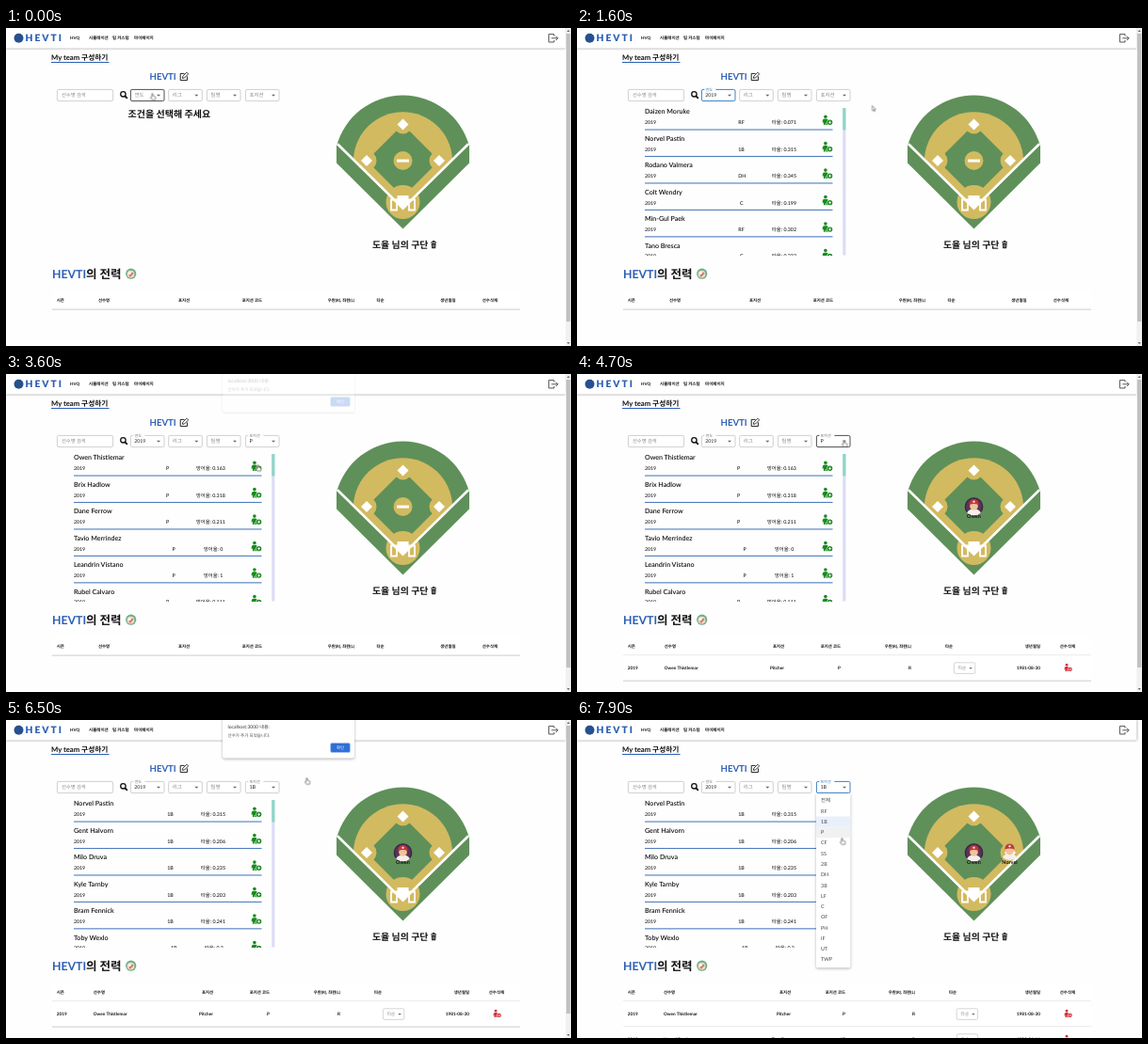
An HTML page that plays this animation: 600x338 px, repeating every 8000 ms.

```html
<!DOCTYPE html>
<html lang="ko">
<head>
<meta charset="utf-8">
<title>My team</title>
<style>
html, body { margin: 0; width: 100%; height: 100%; overflow: hidden; background: #fff; }
svg { display: block; width: 600px; height: 338px; }
text { font-family: Lato, "Noto Sans CJK KR", "Noto Sans KR", "Noto Sans CJK", sans-serif; white-space: pre; text-rendering: geometricPrecision; }
.card { filter: drop-shadow(0 1px .6px rgba(0,0,0,.2)); }
.paper { filter: drop-shadow(0 1.2px 1.6px rgba(0,0,0,.3)); }
</style>
</head>
<body>
<svg id="stage" viewBox="0 0 600 338" xmlns="http://www.w3.org/2000/svg"></svg>
<script>
const LOOP = 8000, BLUE = '#2c5fb5', FOCUS = '#3a80c8', BRAND = 'HEVTI';
let css = '', count = 0;

// Frames are [ms, declarations, glide]; without glide a value holds until the next one.
function track(sel, frames) {
  const name = 'k' + count++;
  const body = frames.map(([t, decl, glide], i) => {
    const next = i + 1 < frames.length ? frames[i + 1][0] : LOOP;
    const ease = glide ? `steps(${Math.max(1, Math.round((next - t) / 100))})` : 'step-end';
    return `${t / LOOP * 100}%{${decl};animation-timing-function:${ease}}`;
  });
  body.push(`100%{${frames[frames.length - 1][1]}}`);
  css += `@keyframes ${name}{${body.join('')}}${sel}{animation:${name} ${LOOP}ms infinite}`;
}

// Spans are [from, to, fadeIn, fadeOut].
function show(sel, ...spans) {
  const off = 'opacity:0', on = 'opacity:1';
  const frames = spans[0][0] > 0 ? [[0, off]] : [];
  for (const [from, to, fadeIn = 0, fadeOut = 0] of spans) {
    if (fadeIn) frames.push([from, off, true]);
    frames.push([from + fadeIn, on]);
    if (fadeOut) frames.push([to - fadeOut, on, true]);
    if (to < LOOP) frames.push([to, off]);
  }
  track(sel, frames);
}

const text = (x, y, size, str, { fill = '#111', weight = 400, anchor = 'start', more = '' } = {}) =>
  `<text x="${x}" y="${y}" font-size="${size}" fill="${fill}" font-weight="${weight}" text-anchor="${anchor}" ${more}>${str}</text>`;
const rect = (x, y, w, h, fill, more = '') =>
  `<rect x="${x}" y="${y}" width="${w}" height="${h}" fill="${fill}" ${more}/>`;
const circle = (x, y, r, fill, more = '') => `<circle cx="${x}" cy="${y}" r="${r}" fill="${fill}" ${more}/>`;
const path = (d, fill, more = '') => `<path d="${d}" fill="${fill}" ${more}/>`;
const line = (d, stroke, w, more = '') => path(d, 'none', `stroke="${stroke}" stroke-width="${w}" ${more}`);
const group = (id, body, more = '') => `<g id="${id}" ${more}>${body}</g>`;
const at = (x, y, body, scale = 1) => `<g transform="translate(${x} ${y}) scale(${scale})">${body}</g>`;

function header() {
  const nav = [[68, 'HVQ'], [88, '시뮬레이션'], [113, '팀 커스텀'], [136, '마이페이지']];
  return rect(0, 0, 594.4, 21.6, '#fff', 'style="filter:drop-shadow(0 .8px .9px rgba(0,0,0,.5))"')
    + circle(13.5, 10.8, 5, '#27508f')
    + text(20.5, 14.2, 10.2, BRAND, { fill: BLUE, weight: 900, more: 'letter-spacing="2"' })
    + nav.map(([x, s]) => text(x, 12.3, 4.5, s, { weight: 700 })).join('')
    + line('M582 8.6V6.6H576.4V15H582V13M579.3 10.8H586M583.8 8.5L586.1 10.8L583.8 13.1', '#555', 1);
}

function titles() {
  return text(48, 33.6, 7.7, 'My team 구성하기', { weight: 700 })
    + rect(48, 36, 61.5, 1, BLUE)
    + text(152.5, 55.4, 9.6, BRAND, { fill: BLUE, weight: 700 })
    + line('M189.5 48.4H185.2V55.6H192.4V51.4', '#222', 1)
    + path('M187.4 53.4L187.8 51.3L191.9 47.2L193.6 48.9L189.5 53Z', '#fff', 'stroke="#222" stroke-width=".9"')
    + text(389, 233.5, 9.9, '도율 님의 구단', { weight: 700 })
    + path('M451.3 227.2H457V228.4H451.3ZM452.8 226H455.5V227H452.8ZM451.7 229H456.6L456.2 234.2H452.1Z', '#222')
    + line('M453.3 230V233.2M455 230V233.2', '#fff', .5)
    + text(49, 265.8, 12.3, BRAND, { fill: BLUE, weight: 700 })
    + text(85, 265.8, 12.5, '의 전력', { weight: 700 })
    + circle(132.7, 261.2, 5.6, '#6fb088')
    + circle(132.5, 261.6, 3.9, '#f1ddcb')
    + path('M130.2 263.4L134 259.4L135.6 260.8L132 264.8Z', '#cf7a68')
    + circle(131.4, 260.6, 1.2, '#fff');
}

function select(id, x, label, filled) {
  const arrow = `${x + 28} 70.7h4l-2 2.1z`;
  return rect(x + .4, 65.4, 35.6, 12.2, '#fff', `id="${id}-box" rx="1.5" stroke="#c4c4c4" stroke-width=".8"`)
    + text(x + 4.5, 73.4, 5.5, label, { fill: '#888', more: `id="${id}-hint"` })
    + path('M' + arrow, '#666')
    + (filled ? group(id + '-value',
      rect(x + 3.4, 64.4, 4 + label.length * 4, 2, '#fff')
      + text(x + 4.4, 66.6, 4.1, label, { fill: '#777', more: `id="${id}-label"` })) : '');
}

function filters() {
  return rect(54.4, 65.4, 59.2, 12.2, '#fff', 'rx="1.5" stroke="#c4c4c4" stroke-width=".8"')
    + text(59, 73.4, 5.3, '선수명 검색', { fill: '#888' })
    + circle(124.4, 70.3, 2.7, 'none', 'stroke="#111" stroke-width="1.3"')
    + line('M126.4 72.3L128.8 74.8', '#111', 1.8)
    + select('year', 132, '연도', true)
    + group('y2019', text(136.2, 73.4, 5.2, '2019', { fill: '#222' }))
    + select('league', 172.3, '리그')
    + select('team', 213, '팀명')
    + select('pos', 254, '포지션', true)
    + group('posP', text(258.4, 73.4, 5.4, 'P', { fill: '#222' }))
    + group('pos1B', text(258.4, 73.4, 5.4, '1B', { fill: '#222' }));
}

function field() {
  const green = '#5f9059', tan = '#d2ba60';
  const base = (x, y) => path(`M${x} ${y - 6}l6 6l-6 6l-6 -6z`, '#fff');
  return path('M351 125.6A73 73 0 0 1 492 125.6V143.4L421.5 213.4L351 143.4Z', green)
    + path('M369 138.6A52.6 52.6 0 0 1 474 138.6L421.5 191Z', tan)
    + path('M421.5 102.5L460 141L421.5 179.5L383 141Z', green)
    + circle(421.5, 102.5, 10, tan) + circle(383, 141, 10.5, tan) + circle(460, 141, 10.5, tan)
    + circle(421.5, 141, 10, tan) + circle(421.5, 185, 18, tan)
    + line('M352 123.2L421.5 191.6L491 123.2', '#fff', 2.6)
    + base(421.5, 102.5) + base(383, 141) + base(460, 141)
    + rect(415, 139.6, 13, 3, '#fff')
    + path('M415.5 178H427.5V185L421.5 191L415.5 185Z', '#fff')
    + line('M409 182.5H415V193.5H409ZM428 182.5H434V193.5H428Z', '#fff', 1.8);
}

function token(x, y, name, back) {
  return at(x, y, (back ? circle(0, 0, 10, '#33284a') + circle(0, 0, 8.4, '#5a3553') : '')
    + path('M-7.4 6.4Q-5.4 2.4 0 2.4Q5.4 2.4 7.4 6.4Q4 9.6 0 9.6Q-4 9.6 -7.4 6.4Z', '#f4efec')
    + circle(0, -.6, 4.3, '#efc49d')
    + path('M-5.2 -2Q-4.8 -8 0 -8Q4.8 -8 5.2 -2Q0 -4 -5.2 -2Z', '#c3383b')
    + rect(-1, -6.2, 2, 1.8, '#fff'))
    + text(x, 152.8, 5.5, name, { weight: 700, anchor: 'middle' });
}

const person = (x, y, color, mark, scale) => at(x, y,
  circle(3.9, 1.9, 1.8, color)
  + path('M.6 8.2Q.6 4.4 2.6 4.2H5.2Q6.6 4.4 7 6V10.7H4.4V8.6H3.7V10.7H1.9V6.8L1.5 8.4Z', color)
  + circle(8.6, 8, 3.2, '#fff') + circle(8.6, 8, 2.7, color)
  + line(mark, '#fff', .8), scale);
const PLUS = 'M7 8H10.2M8.6 6.4V9.6', CROSS = 'M7.5 6.9L9.7 9.1M9.7 6.9L7.5 9.1';

// Rows are [name, position, stat].
function list(id, stat, rows) {
  const sub = { weight: 500 };
  const items = rows.map(([name, pos, value], i) => {
    const y = 80 + i * 28.45, short = value.length < 4;
    const statX = stat === '타율' ? (short ? 211 : 207) : (short ? 210 : 202);
    const posX = stat === '타율' ? (short ? 175 : pos === 'C' ? 173 : 171.3) : (short ? 176.5 : 170);
    return text(72, y + 11.4, 7.1, name, { weight: 600 })
      + text(72, y + 22.2, 5.2, '2019', sub)
      + text(posX, y + 22.2, 5.3, pos, sub)
      + text(statX, y + 22.2, 5.3, `${stat}: ${value}`, sub)
      + person(260, y + 12.3, '#178a1c', PLUS)
      + rect(72, y + 27.5, 199.5, 1.1, '#4f7cbd');
  });
  return group(id, items.join('') + rect(282.2, 85, 3.2, 156.5, '#dcdcf8') + rect(282.2, 85, 3.2, 23.5, '#8fd6c6'),
    'clip-path="url(#listClip)"');
}

// ends: right edges of position, code, hand, order, birth and delete columns.
function table(id, nameX, ends, selX, rows) {
  const heads = ['포지션', '포지션 코드', '우완(R), 좌완(L)', '타순', '생년월일', '선수삭제'];
  const bold = { weight: 700 }, end = { weight: 700, anchor: 'end' };
  const top = text(53.8, 291.2, 4.4, '시즌', bold) + text(nameX, 291.2, 4.4, '선수명', bold)
    + heads.map((h, i) => text(ends[i], 291.2, 4.4, h, end)).join('');
  const body = rows.map(([name, pos, code, birth], i) => {
    const y = 299 + i * 27;
    return rect(49, y - .6, 497, .7, '#e2e2e2')
      + text(53.8, y + 14.7, 4.7, '2019', bold) + text(nameX, y + 14.7, 4.7, name, bold)
      + [[0, pos], [1, code], [2, 'R'], [4, birth]].map(([c, s]) => text(ends[c], y + 14.7, 4.7, s, end)).join('')
      + rect(selX, y + 7.8, 22.4, 11.6, '#fff', 'rx="1.4" stroke="#c4c4c4" stroke-width=".7"')
      + text(selX + 4.4, y + 15.4, 4.7, '타순', { fill: '#888' })
      + path(`M${selX + 16} ${y + 13}h3.4l-1.7 1.8z`, '#666')
      + person(517, y + 8.7, '#d3323b', CROSS, .78);
  });
  const h = 18.6 + rows.length * 27;
  return group(id, rect(49, 280, 497, h, '#fff', 'class="card"') + top + body.join(''));
}

const PITCH = 11.27;
function menu(id, x, items, inner = '') {
  return group(id, rect(x, 78, 36.4, items.length * PITCH + 5, '#fff', 'rx="1.5" class="paper"') + inner
    + items.map((s, i) => text(x + 5, 87.4 + i * PITCH, 5.4, s, { fill: '#444' })).join(''));
}

function dialog() {
  return group('dialog', rect(230, -4, 140, 44.6, '#fff', 'rx="2.5" class="paper"')
    + text(235.5, 9.4, 5, 'localhost:3000 내용:', { fill: '#333' })
    + text(235.5, 18, 4.5, '선수가 추가 되었습니다.', { fill: '#444' })
    + rect(344.6, 24.4, 20.8, 10.2, '#2f6fd6', 'rx="1.6" stroke="#a9c5f2" stroke-width=".8"')
    + text(355, 31.2, 4.4, '확인', { fill: '#fff', anchor: 'middle' }));
}

const pageBar = group('pageBar', rect(594.3, 0, 5.7, 338, '#f1f1f1') + rect(595, 6, 4.3, 306, '#c1c1c1')
  + path('M595.6 4L597.2 2L598.8 4ZM595.6 334L597.2 336L598.8 334Z', '#666'));

const cursor = group('cursor',
  group('arrow', path('M0 0V5.4L1.3 4.3L2.2 6.3L3 5.9L2.2 4H3.8Z', '#fff', 'stroke="#333" stroke-width=".5"'))
  + group('hand', path('M-.7 .5Q0 -.4 .7 .5V2.8L3 3.3Q3.6 3.6 3.5 4.4L3 6.8H-.4L-2.1 4.4Q-2 3.6 -.7 4.2Z',
    '#fff', 'stroke="#333" stroke-width=".55"')));

const posItems = '전체 RF 1B P CF SS 2B DH 3B LF C OF PH IF UT TWP'.split(' ');
const years = ['전체', ...Array.from({ length: 8 }, (_, i) => 2022 - i)];
const bar = (id, x, fill) => rect(x, 80, 36.4, PITCH, fill, `id="${id}"`);

const pitcher = ['Owen Thistlemar', 'Pitcher', 'P', '1981-08-30'];
const first = ['Norvel Pastin', 'First Base', '1B', '1980-01-16'];
const late = [227, 285, 359, 403, 492, 529];

document.getElementById('stage').innerHTML =
  '<defs><clipPath id="listClip"><rect x="60" y="80" width="235" height="161.5"/></clipPath></defs>'
  + rect(0, 0, 600, 338, '#fefefe') + header() + titles() + filters()
  + group('prompt', text(129.5, 94.6, 10, '조건을 선택해 주세요', { weight: 700 }))
  + list('listAll', '타율', [['Daizen Moruke', 'RF', '0.071'], ['Norvel Pastin', '1B', '0.315'],
    ['Rodano Valmera', 'DH', '0.345'], ['Colt Wendry', 'C', '0.199'], ['Min-Gul Paek', 'RF', '0.302'],
    ['Tano Bresca', 'C', '0.233']])
  + list('listP', '방어율', [['Owen Thistlemar', 'P', '0.163'], ['Brix Hadlow', 'P', '0.318'],
    ['Dane Ferrow', 'P', '0.211'], ['Tavio Merrindez', 'P', '0'], ['Leandrin Vistano', 'P', '1'],
    ['Rubel Calvaro', 'P', '0.111']])
  + list('list1B', '타율', [['Norvel Pastin', '1B', '0.315'], ['Gent Halvorn', '1B', '0.206'],
    ['Milo Druva', '1B', '0.235'], ['Kyle Tarnby', '1B', '0.203'], ['Bram Fennick', '1B', '0.241'],
    ['Toby Wexlo', '1B', '0.3']])
  + field()
  + group('tokenP', token(421.5, 141, 'Owen', true))
  + group('token1B', token(459.5, 139.5, 'Norvel', false))
  + table('table0', 98, [195, 272, 370, 401.5, 477.5, 522], 0, [])
  + table('table1', 92.8, [220, 280, 355, 399, 492, 529], 400.4, [pitcher])
  + table('table2', 92, late, 403.2, [pitcher, first])
  + pageBar
  + menu('yearMenu', 132, years, bar('yearHover', 132, '#f1f1f1'))
  + menu('posMenu', 254, posItems, bar('picked', 254, '#e8f0fb') + bar('hover', 254, '#f1f1f1'))
  + dialog() + cursor;

show('#prompt', [0, 1200]);
show('#listAll', [1200, 2700]);
show('#listP', [2700, 5700]);
show('#list1B', [5700, LOOP]);
show('#tokenP', [4400, LOOP]);
show('#token1B', [7000, LOOP]);
show('#table0', [0, 4300]);
show('#table1', [4300, 6900]);
show('#table2', [6900, LOOP]);
show('#pageBar', [0, 300], [1000, 2000], [2700, 5000], [5600, 7300]);
show('#yearMenu', [200, 1200, 300, 200]);
show('#posMenu', [1900, 2900, 300, 200], [4900, 5800, 300, 200], [7200, LOOP, 300]);
show('#dialog', [3500, 4300, 400], [6200, 6900, 300]);
show('#year-hint', [0, 1000]);
show('#year-value', [1000, LOOP]);
show('#y2019', [1000, LOOP]);
show('#pos-hint', [0, 2600]);
show('#pos-value', [2600, LOOP]);
show('#posP', [2600, 5600]);
show('#pos1B', [5600, LOOP]);
show('#hand', [0, 1100], [1800, 2700], [3200, LOOP]);
show('#arrow', [1100, 1800], [2700, 3200]);

const rest = 'stroke:#c4c4c4;stroke-width:.8px', over = 'stroke:#222;stroke-width:.8px',
  focus = `stroke:${FOCUS};stroke-width:1px`;
track('#year-box', [[0, over], [300, focus], [2000, rest]]);
track('#year-label', [[0, `fill:${FOCUS}`], [2000, 'fill:#777']]);
track('#pos-box', [[0, rest], [1800, over], [2000, focus], [3500, rest], [4600, over], [5000, focus], [6200, rest],
  [7100, over], [7300, focus]]);
track('#pos-label', [[0, `fill:${FOCUS}`], [3500, 'fill:#777'], [5000, `fill:${FOCUS}`], [6200, 'fill:#777'],
  [7300, `fill:${FOCUS}`]]);

const row = (i, fill = '#f1f1f1') => `opacity:1;fill:${fill};transform:translateY(${i * PITCH}px)`;
const hidden = 'opacity:0';
track('#yearHover', [[0, hidden], [500, row(1)], [600, row(2)], [700, row(4)], [900, row(4, '#b4bcc5')]]);
track('#hover', [[0, hidden], [2200, row(0)], [2300, row(1)], [2400, row(2)], [2500, row(3)],
  [2600, row(3, '#9ea8b2')], [3000, hidden], [5200, row(0)], [5300, row(1)], [5400, row(2)],
  [5500, row(2, '#b4bcc5')], [5900, hidden], [7500, row(0)], [7600, row(1)], [7700, row(2, '#dfe9f8')], [7800, row(3)]]);
track('#picked', [[0, hidden], [4900, row(3, '#e8f0fb')], [5900, row(2, '#e8f0fb')]]);

const tip = (t, x, y, glide) => [t, `transform:translate(${x}px,${y}px)`, glide];
track('#cursor', [
  tip(0, 155.5, 69.5), tip(300, 155.5, 69.5, true), tip(700, 150, 130), tip(1000, 150, 130, true),
  tip(1600, 313.5, 82.5, true), tip(1800, 272, 70), tip(2100, 272, 70, true), tip(2500, 275, 117),
  tip(2600, 275, 117, true), tip(2700, 292.3, 111.3, true), tip(3300, 267.5, 96.5), tip(3800, 267.5, 96.5, true),
  tip(4200, 354, 28), tip(4300, 354, 28, true), tip(4700, 283.5, 70.5), tip(5100, 283.5, 70.5, true),
  tip(5400, 270, 106), tip(5600, 270, 106, true), tip(5800, 272, 101), tip(6000, 272, 101, true),
  tip(6200, 267.5, 96.5), tip(6300, 267.5, 96.5, true), tip(6500, 319.5, 61.5, true), tip(6700, 354, 28),
  tip(6800, 354, 28, true), tip(7100, 276, 70), tip(7400, 276, 70, true), tip(7900, 281.5, 125.5)
]);

const sheet = document.createElement('style');
sheet.textContent = css;
document.head.append(sheet);
</script>
</body>
</html>
```
